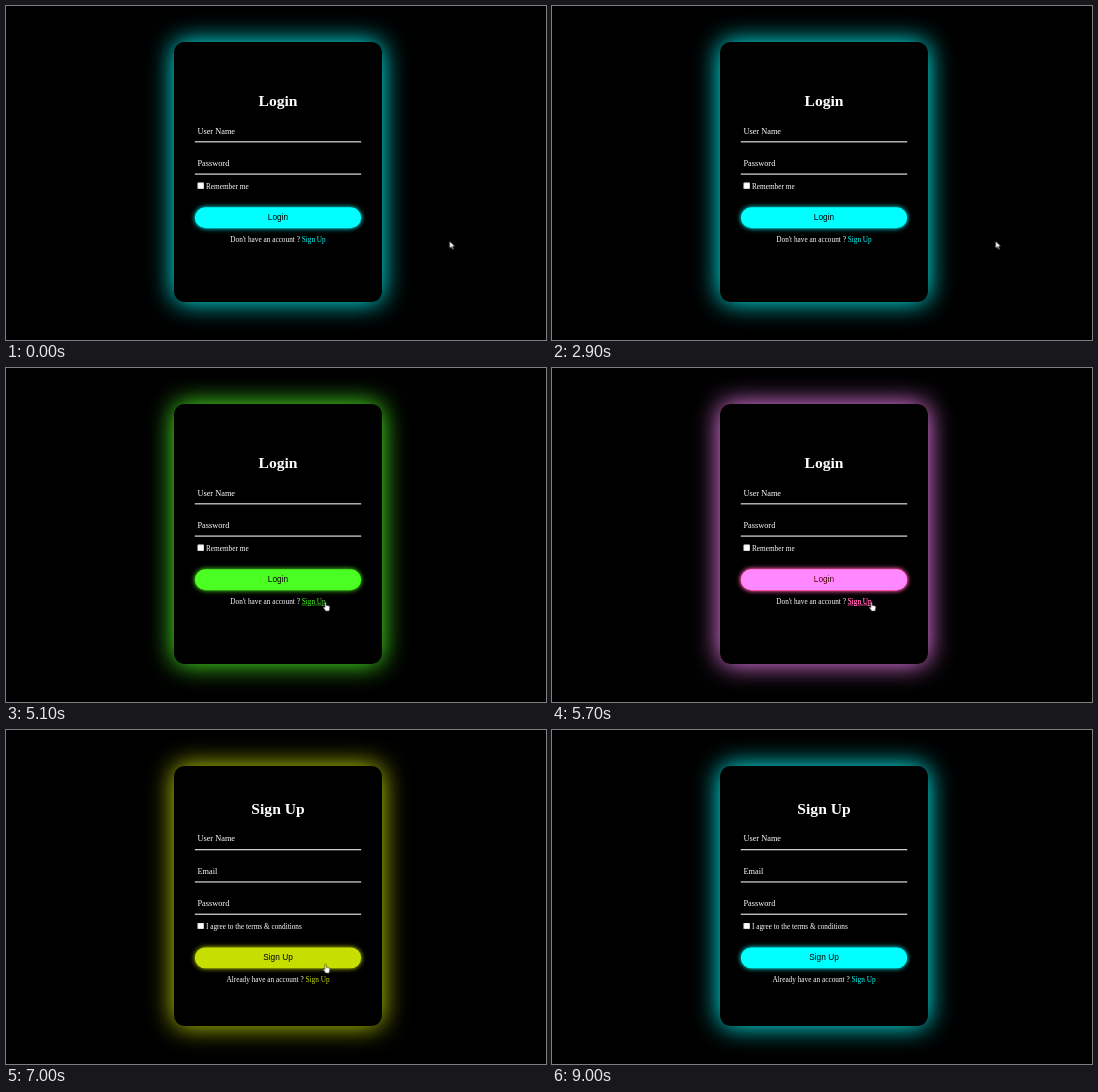
An HTML page for the animation above (9100 ms loop, 540 by 334 pixels).

```html
<!DOCTYPE html>
<html lang="en">
<head>
<meta charset="utf-8">
<title>Login card</title>
<style>
* { margin: 0; padding: 0; box-sizing: border-box; }
html, body { width: 100%; height: 100%; overflow: hidden; background: #000; }
body { position: relative; font-family: "Liberation Serif", "Times New Roman", serif; color: #fff; }

.card, .form, .cursor, .arrow, .hand, .link u {
  animation: 9100ms linear infinite paused;
}
.card {
  position: absolute; left: 168px; top: 35.7px; width: 400px; height: 500px;
  transform: scale(.52); transform-origin: 0 0;
  border-radius: 20px; background: #000; box-shadow: 0 0 50px aqua;
  overflow: hidden; animation-name: hue;
}
.form {
  position: absolute; inset: 0; padding: 0 40px;
  display: flex; flex-direction: column; justify-content: center;
}
.login { animation-name: leave; }
.signup { animation-name: enter; }
h2 { font-size: 30px; line-height: 34px; text-align: center; }
.field {
  height: 42px; margin-top: 20px; padding-left: 5px;
  border-bottom: 2px solid #fff; font-size: 16px; line-height: 40px;
}
.check { margin: 15px 0 30px 5px; height: 18px; font-size: 14px; line-height: 18px; }
.check input { width: 13px; height: 13px; }
.button {
  height: 40px; border-radius: 30px; background: aqua; box-shadow: 0 0 10px aqua;
  color: #000; font: 16px/40px "Liberation Sans", Arial, sans-serif; text-align: center;
}
.link { margin: 15px 0; font-size: 14px; line-height: 16px; text-align: center; }
.link u { color: aqua; text-decoration: none; }
.login u { animation-name: underline; }

.cursor { position: absolute; left: 0; top: 0; width: 0; height: 0; animation-name: move; }
.cursor svg { position: absolute; overflow: visible; width: 15px; height: 20px; transform: scale(.46); transform-origin: 0 0; }
.cursor path { fill: #fff; stroke: #000; stroke-width: 1; }
.arrow { animation-name: arrow; }
.hand { left: -2.5px; animation-name: hand; }

/* One turn per second while the pointer is over the card */
@keyframes hue {
  0%, 47.14% { filter: hue-rotate(0deg); }
  79.67% { filter: hue-rotate(1065.6deg); }
  79.68%, 100% { filter: hue-rotate(0deg); }
}
@keyframes leave {
  0%, 65% { transform: translateY(0); animation-timing-function: ease-in-out; }
  75.99%, 100% { transform: translateY(-450px); }
}
@keyframes enter {
  0%, 65% { transform: translateY(450px); animation-timing-function: ease-in-out; }
  75.99%, 100% { transform: translateY(0); }
}
@keyframes underline {
  0%, 53.8% { text-decoration: none; }
  53.81%, 100% { text-decoration: underline; }
}
@keyframes move {
  0%, 44.4% { transform: translate(443.5px, 235px); }
  47.14% { transform: translate(376px, 238px); }
  49.45% { transform: translate(344.5px, 238.5px); animation-timing-function: ease-out; }
  54%, 77.4% { transform: translate(319px, 234px); }
  79.67% { transform: translate(376px, 236px); }
  81.3%, 83% { transform: translate(411px, 237px); }
  91%, 100% { transform: translate(434px, 237px); }
}
@keyframes arrow {
  0%, 53.8% { visibility: visible; }
  53.81%, 77.9% { visibility: hidden; }
  77.91%, 92.2% { visibility: visible; }
  92.21%, 100% { visibility: hidden; }
}
@keyframes hand {
  0%, 53.8% { visibility: hidden; }
  53.81%, 77.9% { visibility: visible; }
  77.91%, 100% { visibility: hidden; }
}
</style>
</head>
<body>
<div class="card">
  <div class="form login">
    <h2>Login</h2>
    <div class="field">User Name</div>
    <div class="field">Password</div>
    <div class="check"><input type="checkbox"> Remember me</div>
    <div class="button">Login</div>
    <p class="link">Don't have an account ? <u>Sign Up</u></p>
  </div>
  <div class="form signup">
    <h2>Sign Up</h2>
    <div class="field">User Name</div>
    <div class="field">Email</div>
    <div class="field">Password</div>
    <div class="check"><input type="checkbox"> I agree to the terms &amp; conditions</div>
    <div class="button">Sign Up</div>
    <p class="link">Already have an account ? <u>Sign Up</u></p>
  </div>
</div>
<div class="cursor">
  <svg class="arrow"><path d="M0 0V16L4 12.5 6.5 18.5 9 17.5 6.5 11.5H11.5Z"/></svg>
  <svg class="hand"><path d="M4 1.5Q4 0 5.5 0T7 1.5V7l6 1.5q2 .5 2 2.5l-1 6-1 3H6l-5-7q-1-2 .5-2.5T4 12Z"/></svg>
</div>
<script>
// Advance the paused keyframes at ten pictures per second.
const TICK = 100, LOOP = 9100;
const animations = document.getAnimations();
const start = performance.now();
function draw() {
  const elapsed = (performance.now() - start) % LOOP;
  const time = Math.floor(elapsed / TICK) * TICK;
  for (const animation of animations) animation.currentTime = time;
  requestAnimationFrame(draw);
}
draw();
</script>
</body>
</html>
```
